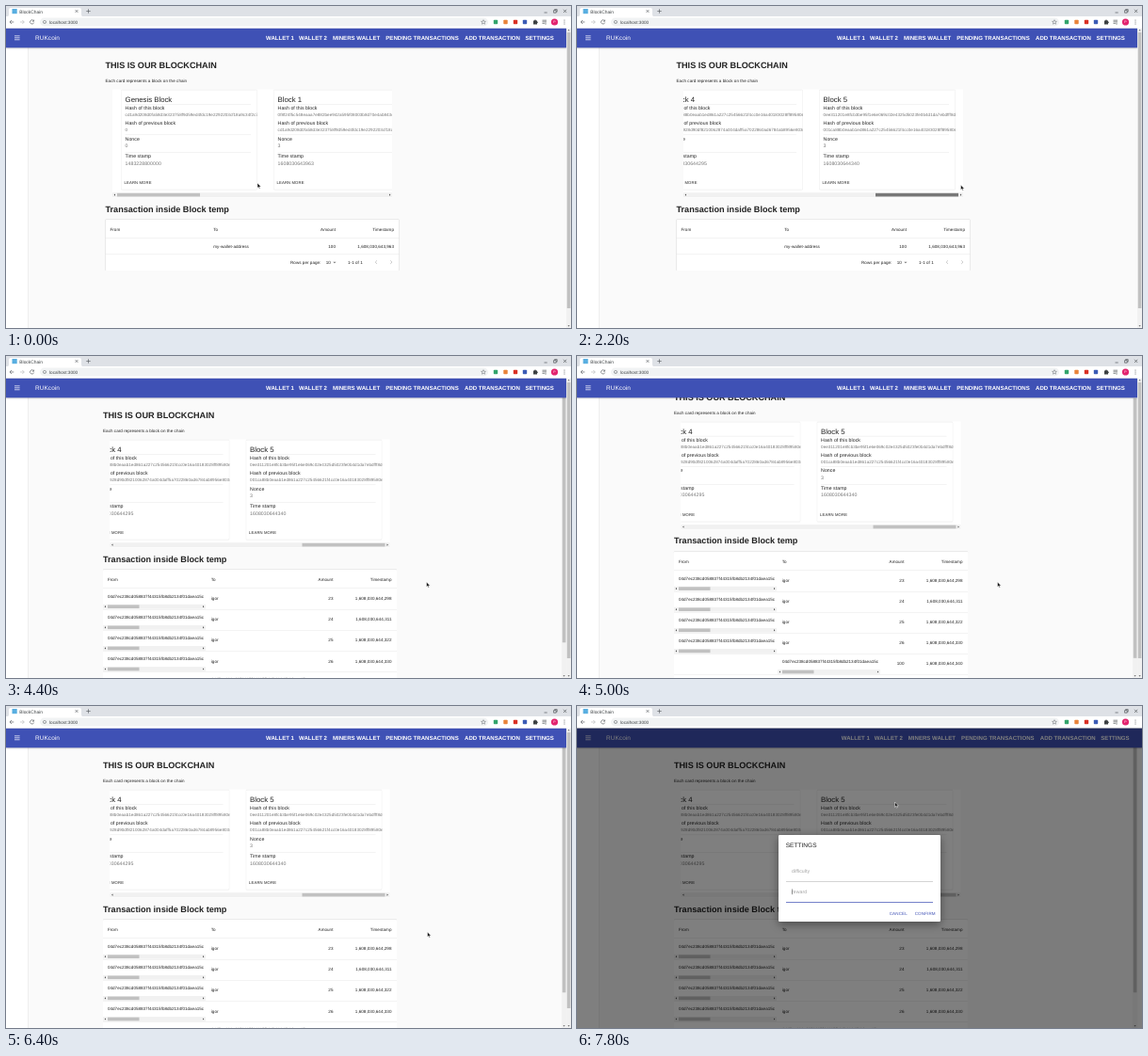
Recreate the animation shown at these times as an HTML page. Size 600 by 342 pixels, loop 8 s.

```html
<!DOCTYPE html>
<html lang="en">
<head>
<meta charset="utf-8">
<title>BlockChain</title>
<style>
html, body { margin: 0; width: 100%; height: 100%; overflow: hidden; background: #fafafa; }
svg { display: block; width: 600px; height: 342px; font-family: "Liberation Sans", Arial, sans-serif; text-rendering: geometricPrecision; }
.paper { fill: #fff; filter: drop-shadow(0 .4px .5px rgba(0,0,0,.3)); }
.bar { fill: #3f51b5; filter: drop-shadow(0 .8px 1px rgba(0,0,0,.35)); }
.dialog { fill: #fff; filter: drop-shadow(0 3px 5px rgba(0,0,0,.4)); }
</style>
</head>
<body>
<svg id="stage" viewBox="0 0 600 342"></svg>
<script>
const LOOP = 8000, STEP = 200;
const $ = id => document.getElementById(id);

// ---- drawing helpers ----
const text = (x, y, str, size = 4.54, { fill = '#212121', anchor = 'start', bold = 0, gap = .0107 } = {}) =>
  `<text x="${x}" y="${y}" font-size="${size}" fill="${fill}" text-anchor="${anchor}"` +
  ` font-weight="${bold ? 700 : 400}" letter-spacing="${(gap * size).toFixed(3)}">${str}</text>`;
const rect = (x, y, w, h, fill, more = '') =>
  `<rect x="${x}" y="${y}" width="${w}" height="${h}" fill="${fill}" ${more}/>`;
const line = (d, stroke, width = .7) =>
  `<path d="${d}" fill="none" stroke="${stroke}" stroke-width="${width}"/>`;
const shape = (d, fill) => `<path d="${d}" fill="${fill}"/>`;
const dot = (x, y, r, fill) => `<circle cx="${x}" cy="${y}" r="${r}" fill="${fill}"/>`;
const rule = (x1, x2, y) => rect(x1, y, x2 - x1, .35, '#dcdcdc');
const heading = (y, str) => text(105.5, y, str, 9.1, { bold: 1, gap: 0 });

function hScroll(x, y, w, thumbX, thumbW, id = '') {
  const m = y + 2.4;
  return rect(x, y, w, 4.8, '#f1f1f1') +
    shape(`M${x + 3} ${m - 1.1}v2.2l-1.4-1.1zM${x + w - 3} ${m - 1.1}v2.2l1.4-1.1z`, '#505050') +
    rect(thumbX, y + .6, thumbW, 3.6, '#c1c1c1', id && `id="${id}"`);
}
function vScroll(x, y, h, thumbY, thumbH, id) {
  const m = x + 2.4;
  return rect(x, y, 5, h, '#f1f1f1') +
    shape(`M${m - 1.1} ${y + 2.8}h2.2l-1.1-1.4zM${m - 1.1} ${y + h - 2.8}h2.2l-1.1 1.4z`, '#505050') +
    rect(x + .6, thumbY, 3.6, thumbH, '#c1c1c1', `id="${id}"`);
}

// ---- browser window ----
function browser() {
  const grey = '#5f6368';
  const badges = [[520, '#35a56c'], [530.5, '#e8833a'], [541, '#d93025'], [551, '#3b5bb5']];
  return rect(0, 0, 600, 11.5, '#dee1e6') + rect(0, 11, 600, 12.6, '#fff') +
    shape('M1 11.2q2 0 2-2V4q0-2 2-2H78q2 0 2 2v5.2q0 2 2 2z', '#fff') +
    rect(6.5, 3, 5.2, 5.2, '#58aee0') +
    text(14.3, 7.6, 'BlockChain', 4.9, { fill: '#3c4043', gap: 0 }) +
    line('M73.6 4.1l2.8 2.8m0-2.8l-2.8 2.8M85.3 5.5h4.4M87.5 3.3v4.4', grey) +
    line('M571.5 7h3.2M581.6 4.6h2.6v2.6h-2.6zM582.6 4.4v-.8h2.6v2.6h-.8M592 3.8l3.2 3.2m0-3.2l-3.2 3.2', '#3c4043', .6) +
    line('M8.3 17H4m2-2l-2 2 2 2', grey) + line('M15 17h4.3m-2-2l2 2-2 2', '#babcbe') +
    line('M29.2 15.6a2.1 2.1 0 1 0 .4 2M29.6 14.6v1.6h-1.6', grey) +
    rect(36, 12.6, 476, 8.8, '#f1f3f4', 'rx="4.4"') +
    dot(41, 17, 1.8, grey) + dot(41, 17, 1.3, '#f1f3f4') + rect(40.75, 16.7, .5, 1.2, grey) +
    text(46, 18.6, 'localhost:3000', 4.7, { fill: '#3c4043', gap: 0 }) +
    line('M507 14.7l.7 1.6 1.7.1-1.3 1.1.4 1.7-1.5-.9-1.5.9.4-1.7-1.3-1.1 1.7-.1z', grey, .5) +
    badges.map(([x, c]) => rect(x - 2.2, 14.8, 4.4, 4.4, c, 'rx=".8"')).join('') +
    shape('M560 15.4h1.2a.8 .8 0 0 1 1.6 0h1.2v1.2a.8 .8 0 0 1 0 1.6v1.2h-4z', '#3c4043') +
    line('M569.5 15.2h4.5M569.5 16.8h4.5M569.5 18.4h2.4M573 17.6v2.2', '#3c4043', .6) +
    dot(582.5, 17, 3.6, '#e3246f') + text(582.5, 18.3, 'P', 3.6, { fill: '#fff', anchor: 'middle' }) +
    [15, 17, 19].map(y => dot(593, y, .55, grey)).join('');
}

function appBar() {
  const items = [[276, 'WALLET 1'], [311, 'WALLET 2'], [347, 'MINERS WALLET'],
    [403.3, 'PENDING TRANSACTIONS'], [487, 'ADD TRANSACTION'], [551.5, 'SETTINGS']];
  return `<rect id="bar" class="bar" y="23.5" width="595" height="20.8"/>` +
    line('M9 31.8h5.6M9 33.8h5.6M9 35.8h5.6', '#fff', .7) +
    text(31, 36.1, 'RUKcoin', 6.49, { fill: '#fff', gap: .0075 }) +
    `<g id="nav">${items.map(([x, s]) => text(x, 36, s, 6.07, { fill: '#fff', bold: 1, gap: 0 })).join('')}</g>`;
}

// ---- block cards ----
const hashes = ['0',
  'cd1a9d208d0fa58d3e323758f9d59ed4fdc19e2292203cf18a9c34f2c7d1',
  '0f8f24f5c548eaaa7e882bee942a595f08003b8d70e4ab843d887ca2e41b',
  '019625a68fef4d6b7ec627d477905f21c2d0e4c29b2f645c1be180963a5d',
  '0e206928d90df82100628 74a004daff5a7022860ad6784ab8956e803c92'.replace(' ', ''),
  '001ca88b0eaab1ed861a227c25456621f4cc0e16a40183028ff89580e6b7',
  '0ee311201e8fcb3be95f1e6e069c02e4325d5023fe0b4d1da7ebdfff8d02'];
const nonces = [0, 3, 2, 1, 0, 3];
const stamps = [1483228800000, 1608030643963, 1608030644132, 1608030644225, 1608030644295, 1608030644340];

function card(i) {
  const label = (y, s) => text(4.6, y, s, 5.19, { gap: .0094 });
  const value = (y, s, size = 5.19) => text(4.6, y, s, size, { fill: '#757575' });
  return `<g transform="translate(${122 + 162 * i})" clip-path="url(#cardClip)">` +
    rect(.2, 89.2, 144.6, 106, '#fff', 'rx="1.2" stroke="#dedede" stroke-width=".4"') +
    text(4.6, 102, i ? 'Block ' + i : 'Genesis Block', 7.78, { gap: 0 }) + rule(4.6, 138, 104) +
    label(110, 'Hash of this block') + value(117.2, hashes[i + 1], 4.54) +
    label(126.4, 'Hash of previous block') + value(133.4, hashes[i], 4.54) + rule(4.6, 138, 136.7) +
    label(142.6, 'Nonce') + value(150, nonces[i]) + rule(4.6, 138, 155.5) +
    label(161.3, 'Time stamp') + value(168.6, stamps[i]) +
    text(3.6, 188.8, 'LEARN MORE', 4.22, { gap: .0286 }) + '</g>';
}

// ---- transaction tables ----
const right = { anchor: 'end' };
function tableFrame(bottom, count) {
  const y = bottom - 7.2;
  return `<rect class="paper" x="105.5" y="226.5" width="312" height="${bottom - 226.5}" rx="1.2"/>` +
    text(110.5, 239, 'From') + text(220.3, 239, 'To') + text(350, 239, 'Amount', 4.54, right) +
    text(412, 239, 'Timestamp', 4.54, right) + rule(105.5, 417.5, 246.6) +
    text(302, y, 'Rows per page:') + text(339.7, y, '10') +
    shape(`M347.3 ${y - 2.1}h3.2l-1.6 1.6z`, '#757575') + text(363, y, `1-${count} of ${count}`) +
    line(`M394 ${y - 3.5}l-1.8 1.8 1.8 1.8M408.2 ${y - 3.5}l1.8 1.8-1.8 1.8`, '#a8a8a8', .6);
}
const amounts = (y, n, stamp) =>
  text(350, y, n, 4.54, right) + text(412, y, stamp.toLocaleString('en-US'), 4.54, right);

const shortTable = () => tableFrame(281, 1) + text(220.3, 256.8, 'my-wallet-address') +
  amounts(256.8, 100, stamps[1]) + rule(105.5, 417.5, 263.6);

function longTable() {
  const key = (x, y) => text(x + 5, y, '04d7ec238cd058837f44315fb8db2134f01daea15c', 4.54, { gap: .004 }) +
    hScroll(x, y + 6.9, 109, x + 5, 33.5);
  const row = (n, i) => {
    const y = 259.2 + 22.1 * i;
    return (n < 100 ? key(105.5, y - 2.3) + text(220.3, y, 'igor') : key(215.5, y - 2.3)) +
      amounts(y, n, 1608030644000 + [298, 311, 322, 330, 340][i]) + rule(105.5, 417.5, y + 10);
  };
  return tableFrame(374, 5) + [23, 24, 25, 26, 100].map(row).join('');
}

function page() {
  return heading(66.3, 'THIS IS OUR BLOCKCHAIN') +
    text(105.5, 81, 'Each card represents a block on the chain') +
    rect(113, 88.5, 297, 115, '#fff') +
    `<g clip-path="url(#stripClip)"><g id="strip">${hashes.slice(1).map((h, i) => card(i)).join('')}</g></g>` +
    rect(123, 183, 33, 9, 'rgba(0,0,0,.04)', 'id="hover" rx="1" transform="translate(135)"') +
    hScroll(113, 198.2, 297, 118, 88, 'thumb') +
    heading(218.6, 'Transaction inside Block temp') +
    `<g id="short">${shortTable()}</g><g id="long">${longTable()}</g>`;
}

function dialog() {
  const blue = '#3f51b5', hint = { fill: '#a2a2a2', gap: .0094 };
  return rect(0, 23.5, 600, 318.5, 'rgba(0,0,0,.5)') +
    '<rect class="dialog" x="214" y="137" width="172" height="92" rx="1.3"/>' +
    text(221.7, 150, 'SETTINGS', 6.49, { gap: .0075 }) +
    text(228, 176.5, 'difficulty', 5.19, hint) + rect(222, 186.3, 156, .4, '#949494') +
    text(228, 199, 'reward', 5.19, hint) + rect(222, 208.3, 156, .75, blue) +
    rect(228, 194.4, .45, 5.8, '#222') +
    text(331.7, 222, 'CANCEL', 4.54, { fill: blue, gap: .0286 }) +
    text(358.7, 222, 'CONFIRM', 4.54, { fill: blue, gap: .0286 });
}

const arrow = 'M0 0V5.3L1.2 4.2 2 6.1 2.9 5.7 2.1 3.9H3.8Z';
const hand = 'M-.6 .4Q0-.4 .6 .4V2.2L2.8 2.8Q3.4 3 3.2 3.8L2.7 6H-.6L-2.2 3.7Q-1.8 2.8-.6 3.7Z';

$('stage').innerHTML =
  `<defs><clipPath id="pageClip">${rect(0, 44, 600, 298)}</clipPath>
  <clipPath id="stripClip">${rect(113, 88, 297, 110)}</clipPath>
  <clipPath id="cardClip">${rect(0, 88, 145, 108)}</clipPath></defs>` +
  rect(0, 0, 600, 342, '#fafafa') + rect(0, 44, 23, 298, '#fff') + rect(23, 44, .4, 298, '#dedede') +
  `<g clip-path="url(#pageClip)"><g id="page">${page()}</g>
  <g id="inner">${vScroll(590.2, 23.5, 318.5, 28.3, 276, 'innerThumb')}</g></g>` +
  appBar() + `<g id="outer">${vScroll(595.2, 23.5, 318.5, 28, 293, 'outerThumb')}</g>` +
  browser() + `<g id="dialog">${dialog()}</g>` +
  '<path id="cursor" stroke-width=".5" stroke-linejoin="round"/>';

// ---- motion: [time, values...] ----
const pointer = [[0, 267, 188], [400, 205.5, 199.5], [600, 205.5, 199.5], [1400, 307, 195.5], [2200, 407.5, 190],
  [3000, 276, 186], [3200, 276, 186], [4400, 446.5, 240], [5800, 446.5, 240], [6000, 447.5, 240],
  [6400, 447.5, 240], [7000, 560, 17], [7400, 577, 31], [7800, 337.5, 102]];
const drag = [[600, 0], [1400, 101], [2200, 199]];
const scroll = [[4800, 0], [5200, 38.2], [6000, 38.2], [6400, 0]];

function at(track, t) {
  const n = track.findIndex(k => k[0] > t);
  if (n < 0) return track[track.length - 1].slice(1);
  if (n === 0) return track[0].slice(1);
  const a = track[n - 1], b = track[n], p = (t - a[0]) / (b[0] - a[0]);
  return a.slice(1).map((v, i) => v + (b[i + 1] - v) * p);
}
const show = (id, on) => $(id).setAttribute('visibility', on ? 'visible' : 'hidden');
const move = (id, x, y = 0) => $(id).setAttribute('transform', `translate(${x} ${y})`);

function draw(now) {
  const t = Math.floor(now % LOOP / STEP) * STEP;
  const [x, y] = at(pointer, t), [d] = at(drag, t), [s] = at(scroll, t);
  const opened = t >= 3400, modal = t >= 7600;
  const overButton = t >= 2800 && t < 3400, overNav = t === 7400;

  move('page', opened ? -2.5 : 0, -s);
  move('strip', -d * 675 / 199);
  move('thumb', d);
  $('thumb').setAttribute('fill', t >= 600 && t <= 2200 ? '#787878' : t === 400 ? '#a8a8a8' : '#c1c1c1');
  show('hover', overButton);
  show('short', !opened);
  show('long', opened);
  show('inner', opened);
  move('innerThumb', 0, s * .865);

  show('outer', !modal);
  $('bar').setAttribute('width', modal ? 600 : 595);
  move('nav', modal ? 4.8 : 0);
  show('dialog', modal);
  $('dialog').setAttribute('opacity', t === 7600 ? .6 : 1);

  const pointing = overButton || overNav, c = $('cursor');
  c.setAttribute('d', pointing ? hand : arrow);
  c.setAttribute('fill', pointing ? '#fff' : '#111');
  c.setAttribute('stroke', pointing ? '#111' : '#fff');
  move('cursor', x, y);
  requestAnimationFrame(() => draw(performance.now()));
}
draw(performance.now());
</script>
</body>
</html>
```
